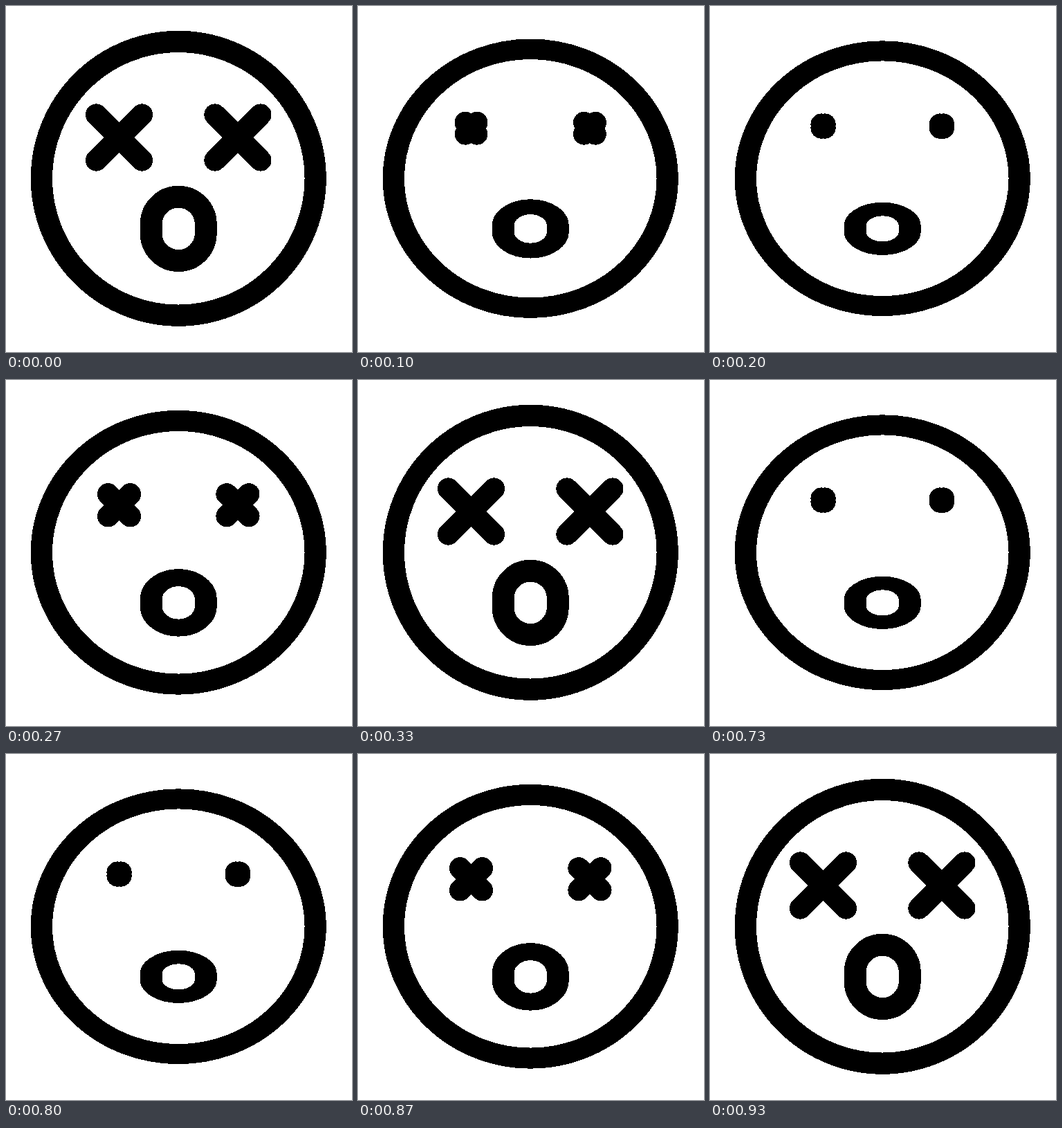
These frames come from a looping animation (500x500 px, 1.16 s). An HTML page:

```html
<!DOCTYPE html>
<html>
<head>
<meta charset="utf-8">
<style>
  html, body { margin: 0; height: 100%; overflow: hidden; background: #fff; }
  svg { display: block; width: 100%; height: 100%; }
</style>
</head>
<body>
<svg viewBox="0 0 500 500" fill="none" stroke="#000" stroke-width="31.2" stroke-linecap="round" shape-rendering="crispEdges">
  <circle id="head" r="197.9"/>
  <path id="eyes"/>
  <rect id="mouth" x="-39.5" y="-46.2" width="79" height="92.4" rx="39.5" stroke-width="31.9"/>
</svg>
<script>
const LOOP = 1160, SECOND_PULSE = 18, PULSE = 10, CENTER = 249.25;
const [head, eyes, mouth] = ['head', 'eyes', 'mouth'].map(id => document.getElementById(id));

const bezier = (a, b, u) => 3 * (1 - u) ** 2 * u * a + 3 * (1 - u) * u * u * b + u ** 3;

// Linear start, soft landing
function ease(x) {
  let lo = 0, hi = 1;
  for (let i = 0; i < 24; i++) {
    const mid = (lo + hi) / 2;
    if (bezier(0.167, 0.667, mid) < x) lo = mid; else hi = mid;
  }
  return bezier(0.167, 1, (lo + hi) / 2);
}

function squash(el, y, scale) {
  el.setAttribute('transform', `translate(${CENTER} ${y}) scale(1 ${scale})`);
}

function cross(x, y, r) {
  return `M${x - r} ${y - r}L${x + r} ${y + r}M${x + r} ${y - r}L${x - r} ${y + r}`;
}

function draw(now) {
  // Thirty poses a second, on a 10 ms clock
  const step = Math.floor((Math.floor((now % LOOP) / 10) + 0.5) * 0.3);
  const k = step % SECOND_PULSE;
  const p = k > 0 && k < PULSE ? ease(1 - Math.abs(2 * k / PULSE - 1)) : 0;

  squash(head, CENTER, 1 - 0.074 * p);
  squash(mouth, 321.9, 1 - 0.42 * p);
  const y = 190 - 17.8 * p, r = 33 * (1 - p) + 0.01;
  eyes.setAttribute('d', cross(CENTER - 85.7, y, r) + cross(CENTER + 85.7, y, r));
}

const start = performance.now();
function tick() {
  draw(performance.now() - start);
  requestAnimationFrame(tick);
}
tick();
</script>
</body>
</html>
```
